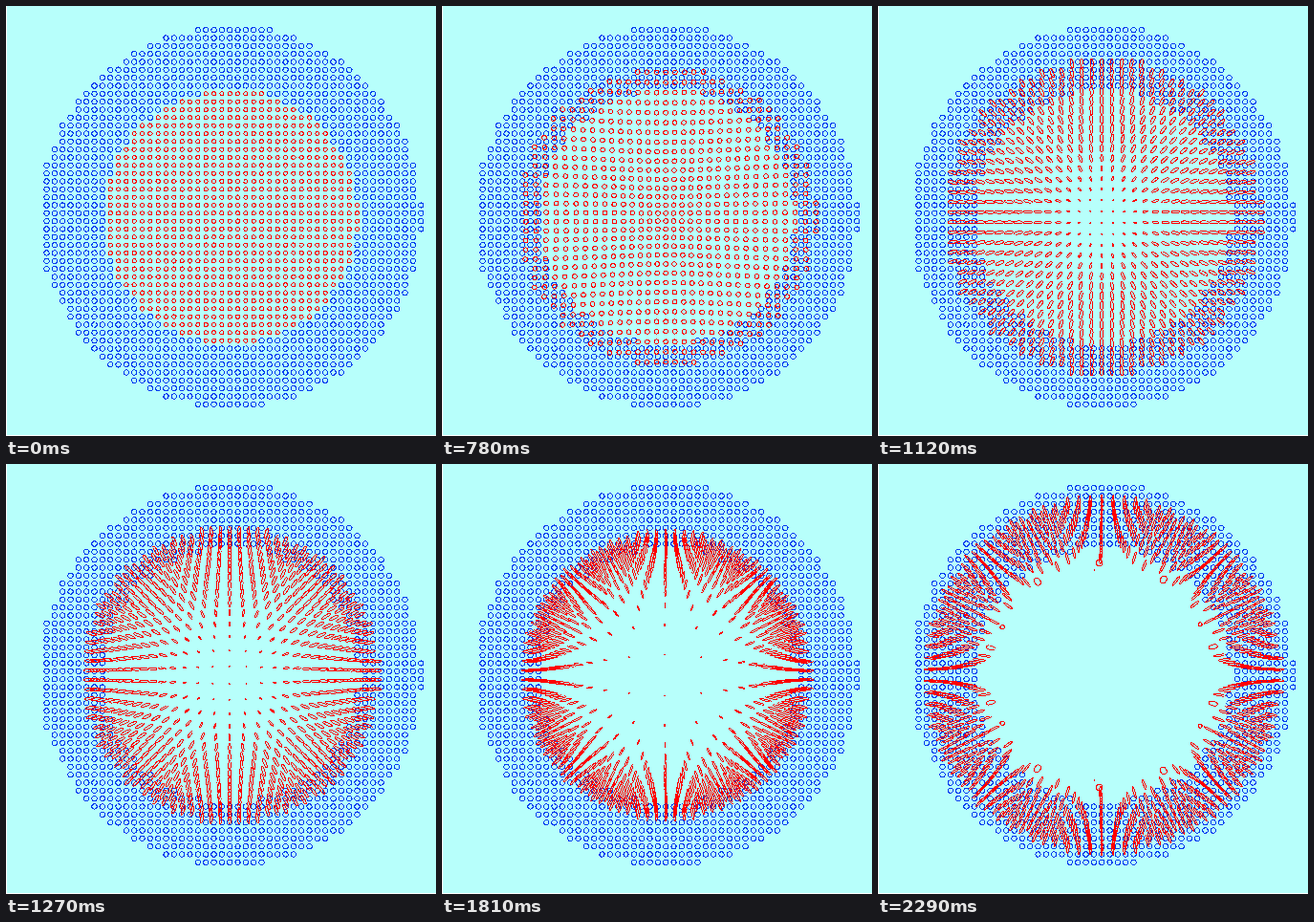
These frames come from a looping animation (450 px wide and 450 px high, 3260 ms). An HTML page:

```html
<!DOCTYPE html>
<html lang="en">
<head>
<meta charset="utf-8">
<title>Expanding disc</title>
<style>
  html, body { margin: 0; width: 100%; height: 100%; overflow: hidden; background: #fff; }
  svg { display: block; width: 100%; height: 100%; }
  path { fill: none; stroke-width: 1; shape-rendering: crispEdges; }
</style>
</head>
<body>
<svg viewBox="0 0 450 450">
  <rect x="1" width="449" height="449" fill="#b7fffb"/>
  <path id="ring" stroke="#003cf0"/>
  <path id="disc" stroke="#f00"/>
</svg>
<script>
const LOOP = 3260, PITCH = 25 / 3, CX = 234.5, CY = 221;
const RADIUS = 16 * PITCH;

const ring = document.getElementById('ring');
const disc = document.getElementById('disc');
const inside = (i, j, radius) => Math.hypot(i - .07, j + .015) <= radius + .002;
const ramp = (t, start, end) => Math.min(1, Math.max(0, (t - start) / (end - start)));

// Ellipse centred at polar (r, angle), semi-axis a along the ray and b across it
function ellipse(r, angle, a, b) {
  const c = Math.cos(angle), s = Math.sin(angle);
  const point = d => `${(CX + d * c).toFixed(2)} ${(CY + d * s).toFixed(2)}`;
  const arc = `A${a.toFixed(2)} ${b.toFixed(2)} ${(angle * 180 / Math.PI).toFixed(2)} 0 1 `;
  return `M${point(r - a)}${arc}${point(r + a)}${arc}${point(r - a)}`;
}

const dots = [];
let ringPath = '';
for (let j = -23.5; j < 24; j++) {
  for (let i = -24; i <= 24; i++) {
    if (!inside(i, j, 24)) continue;
    const x = i * PITCH - .3, y = j * PITCH;
    const r = Math.hypot(x, y), angle = Math.atan2(y, x);
    if (inside(i, j, 16)) dots.push({ r, angle });
    else ringPath += ellipse(r, angle, 2.7, 2.7);
  }
}
ring.setAttribute('d', ringPath);

function draw(t) {
  // The disc swells, draws back while its centre opens, then bursts into the ring
  const swell = ramp(t, 530, 1080), back = ramp(t, 1080, 1560), burst = ramp(t, 1560, 2290);
  const streak = ramp(t, 780, 1120);

  const edge = RADIUS + 36 * Math.sin(swell * Math.PI / 2) - 40 * back + 55 * burst;
  const push = 1.1 * back - .15 * Math.sin(swell * Math.PI) - .5 * Math.min(1, 3 * burst);
  const core = .24 * ((2370 - Math.min(t, 2290)) / 890) ** 1.4;

  const length = 2.1 + .5 * swell + 2 * streak + 1.9 * back;
  const width = 2.1 + .5 * swell - streak - .6 * back;
  const hollow = 1 + 36 * streak - 22 * burst;
  const bulge = 3 * burst ** 2;

  disc.setAttribute('d', dots.map(({ r, angle }) => {
    const u = r / RADIUS;
    const opened = (1 - Math.exp(-u / core)) / (1 - Math.exp(-1 / core));
    const moved = edge * (u + push * (opened - u));
    const size = 1 - Math.exp(-((r / hollow) ** 2));
    const round = bulge * Math.exp(-(((r - 13) / 5) ** 2));
    return ellipse(moved, angle, Math.max(.5, length * size), Math.max(.3, width * size + round));
  }).join(''));
}

function tick() {
  draw(performance.now() % LOOP);
  requestAnimationFrame(tick);
}
tick();
</script>
</body>
</html>
```
